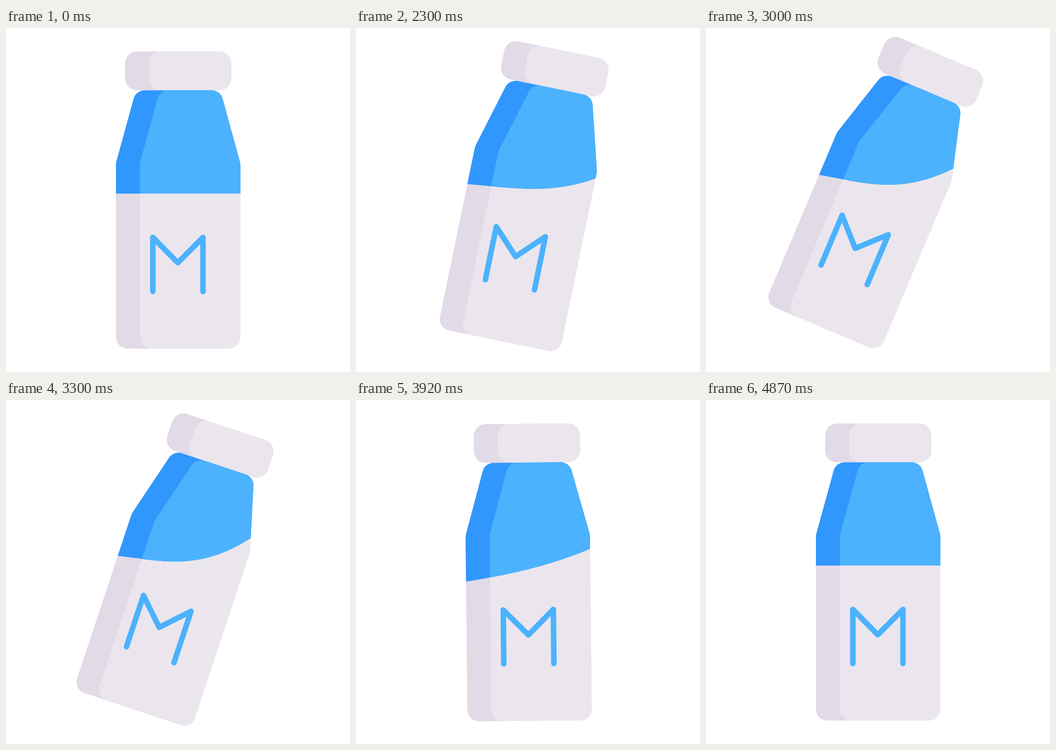
These frames come from a looping animation (748x748 px, 4.92 s). An HTML page with a canvas:

```html
<!DOCTYPE html>
<html lang="en">
<head>
<meta charset="utf-8">
<title>Milk bottle</title>
<style>
html, body { margin: 0; width: 100%; height: 100%; overflow: hidden; background: #fff; }
canvas { display: block; width: 748px; height: 748px; }
</style>
</head>
<body>
<canvas id="stage" width="748" height="748"></canvas>
<script>
const ctx = document.getElementById('stage').getContext('2d');
const LOOP = 4920;
const SIZE = 748;
const PIVOT = { x: 426.5, y: 373.5 };
const SHADE = 52;
const BLUE = '#4cb2fd', DEEP = '#3097fd', PALE = '#ebe6ed', GREY = '#e2dae7';

const smooth = u => u * u * (3 - 2 * u);

// cubic-bezier(.25, .1, .25, 1)
function swing(u) {
  let lo = 0, hi = 1;
  for (let i = 0; i < 24; i++) {
    const s = (lo + hi) / 2, r = 1 - s;
    const x = 0.75 * s * r * r + 0.75 * s * s * r + s * s * s;
    if (x < u) lo = s; else hi = s;
  }
  const s = lo, r = 1 - s;
  return 0.3 * s * r * r + 3 * s * s * r + s * s * s;
}

// Each key is [time, values, easing towards this key]
const tilt = [
  [2005, [0]], [3000, [22.9], swing], [3170, [22.9]], [3663, [-3]], [4023, [0]]
];
const drop = [
  [3210, [0]], [3405, [17]], [3800, [0]]
];
// Milk level at the left, middle and right, and its S-bend
const level = [
  [2005, [360, 360, 360, 0]],
  [3000, [394, 360, 260, 16], swing],
  [3280, [393, 359, 251, 18]],
  [3570, [285, 377, 403, 1]],
  [3920, [393, 367.6, 324.5, 1.7]],
  [4250, [331, 363, 389, 0]],
  [4580, [372, 360, 348, 0]],
  [4870, [360, 360, 360, 0]]
];

function at(track, t) {
  if (t <= track[0][0]) return track[0][1];
  for (let i = 1; i < track.length; i++) {
    const [t0, a] = track[i - 1];
    const [t1, b, ease = smooth] = track[i];
    if (t < t1) {
      const k = ease((t - t0) / (t1 - t0));
      return a.map((v, j) => v + (b[j] - v) * k);
    }
  }
  return track[track.length - 1][1];
}

function body(inset, color) {
  ctx.beginPath();
  ctx.moveTo(374, 135.5);
  ctx.arcTo(466, 135.5, 509.5, 294, 25);
  ctx.arcTo(509.5, 294, 509.5, 697, 35);
  ctx.arcTo(509.5, 697, 374, 697, 25);
  ctx.arcTo(239 + inset, 697, 239 + inset, 294, 25);
  ctx.arcTo(239 + inset, 294, 282.5 + inset, 135.5, 35);
  ctx.arcTo(282.5 + inset, 135.5, 374, 135.5, 25);
  ctx.closePath();
  ctx.fillStyle = color;
  ctx.fill();
}

function cap(inset, color) {
  ctx.beginPath();
  ctx.roundRect(259 + inset, 51, 231 - inset, 84.5, 26);
  ctx.fillStyle = color;
  ctx.fill();
}

function clipAbove([left, mid, right, bend]) {
  const slope = (right - left) / 2;
  const curve = (right + left) / 2 - mid;
  ctx.beginPath();
  ctx.moveTo(220, 100);
  for (let x = 220; x <= 528; x += 4) {
    const s = (x - 374) / 135;
    ctx.lineTo(x, mid + slope * s + curve * s * s + bend * (s - s * s * s));
  }
  ctx.lineTo(528, 100);
  ctx.closePath();
  ctx.clip();
}

function letter() {
  ctx.beginPath();
  ctx.moveTo(319.3, 573);
  ctx.lineTo(319.3, 455.3);
  ctx.lineTo(373.5, 510.5);
  ctx.lineTo(428.3, 455.3);
  ctx.lineTo(428.3, 573);
  ctx.lineWidth = 12;
  ctx.lineCap = ctx.lineJoin = 'round';
  ctx.strokeStyle = BLUE;
  ctx.stroke();
}

function draw(t) {
  ctx.fillStyle = '#fff';
  ctx.fillRect(0, 0, SIZE, SIZE);
  ctx.save();
  ctx.translate(PIVOT.x, PIVOT.y + at(drop, t)[0]);
  ctx.rotate(at(tilt, t)[0] * Math.PI / 180);
  ctx.translate(-PIVOT.x, -PIVOT.y);

  cap(0, GREY);
  cap(SHADE, PALE);
  body(0, GREY);
  body(SHADE, PALE);

  ctx.save();
  clipAbove(at(level, t));
  body(0, DEEP);
  body(SHADE, BLUE);
  ctx.restore();

  letter();
  ctx.restore();
}

const start = performance.now();
function tick() {
  draw((performance.now() - start) % LOOP);
  requestAnimationFrame(tick);
}
tick();
</script>
</body>
</html>
```
